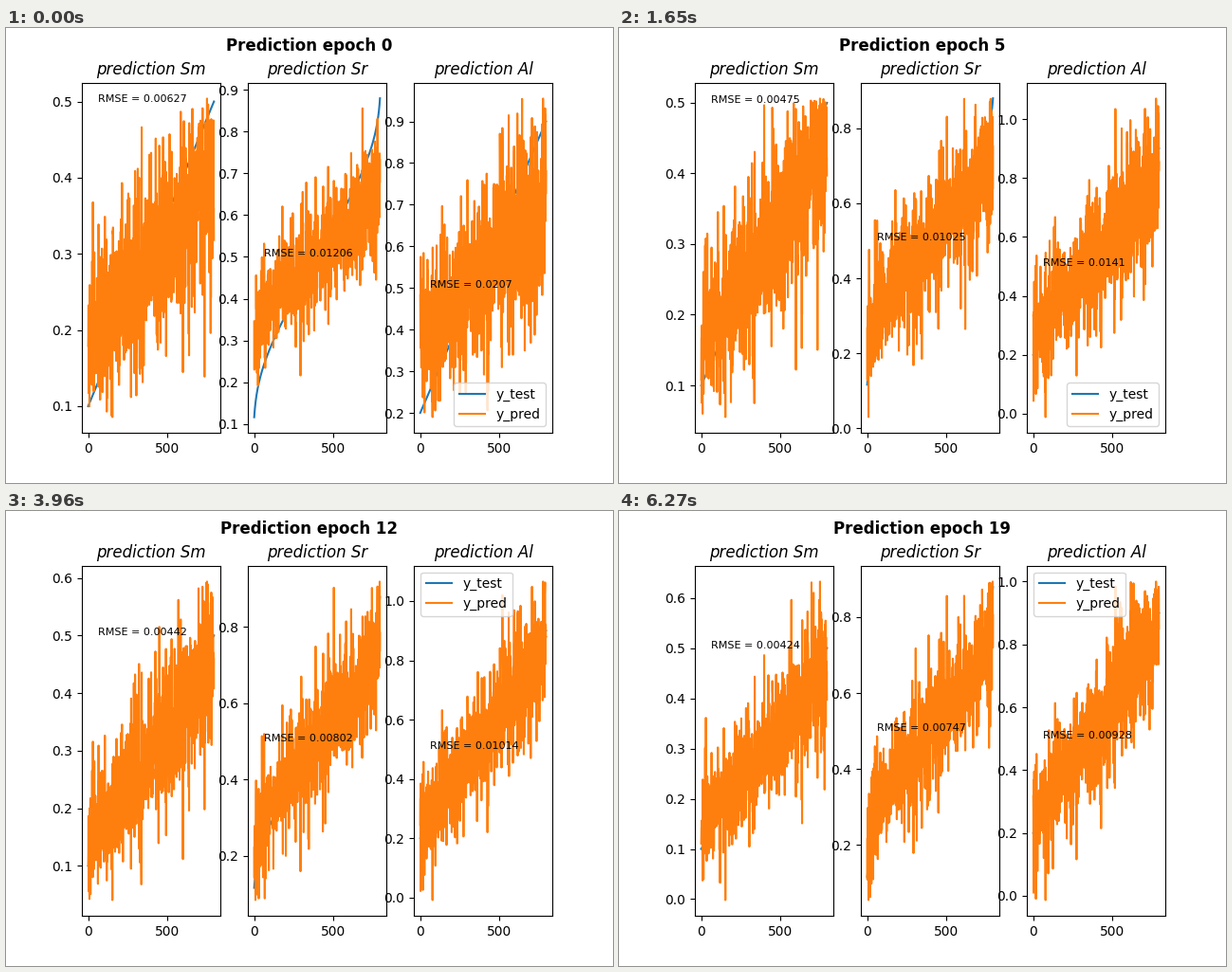
Write a matplotlib script that moves like this. It is 640 px wide and 480 px high and loops after 6.6 s.

```python
import numpy as np
import matplotlib.pyplot as plt
from matplotlib.animation import FuncAnimation

EPOCHS, STEP_MS, N = 20, 330, 800
X = np.arange(N)
U = X / (N - 1)
KEY_EPOCHS = [0, 3, 5, 9, 12, 17, 19]
UPPER_LEGEND = {1, 2, 3, 8, 12, 15, 16, 17, 19}


class Panel:
    """A sorted test curve and a noisy prediction that learns to follow it."""

    def __init__(self, name, seed, truth, level, slope, peaks, low, high, rmse):
        self.name, self.seed, self.truth = name, seed, truth
        self.level, self.slope, self.peaks = level, slope, peaks
        self.keys = low, high, rmse

    def at(self, e):
        return [float(np.interp(e, KEY_EPOCHS, k)) for k in self.keys]

    def predict(self, e):
        low, high, error = self.at(e)
        start, end = self.slope
        slope = end + (start - end) * np.exp(-e / 4)
        centre = self.level + slope * (self.truth - self.level)

        # noise makes up the part of the error that the flat slope leaves
        bias = np.mean((centre - self.truth) ** 2)
        spread = np.sqrt(error - bias) * (0.85 + 0.3 * U)
        lasting = np.random.default_rng(self.seed).standard_t(6, N) / 1.22
        fresh = np.random.default_rng([self.seed, e]).normal(size=N)
        y = centre + spread * (0.87 * lasting + 0.5 * fresh)

        # fold outliers back inside the limits, then touch each limit once
        y = high - abs(high - y)
        y = low + abs(y - low)
        if low < self.truth[0]:
            y[self.peaks[0]] = low
        if high > self.truth[-1]:
            y[self.peaks[1]] = high
        return y


s_curve = 0.498 + 0.362 * (U - 0.5) + 0.0434 * np.log((U + 0.01) / (1.01 - U))
PANELS = [
    Panel("Sm", 11, 0.1 + 0.4 * U, 0.28, (0.57, 0.8), (154, 755),
          low=[.0858, .0760, .0552, .0515, .0409, .0001, -.0017],
          high=[.5039, .5138, .5061, .5466, .5936, .6352, .6323],
          rmse=[.00627, .00509, .00475, .00446, .00442, .0044, .00424]),
    Panel("Sr", 23, s_curve, 0.5, (0.5, 0.8), (8, 797),
          low=[.1172, .0727, .0305, .1088, .0847, .1010, .0555],
          high=[.8787, .8787, .8787, .9283, .9195, .9240, .8938],
          rmse=[.01206, .01029, .01025, .00834, .00802, .00785, .00747]),
    Panel("Al", 37, 0.2 + 0.7 * U, 0.55, (0.5, 0.88), (78, 780),
          low=[.1900, .1117, -.0110, -.0645, -.0092, .0066, -.0133],
          high=[.9550, 1.0137, 1.0695, 1.0518, 1.0659, 1.0598, 1.0003],
          rmse=[.0207, .01459, .0141, .01643, .01014, .00951, .00928]),
]

fig, axes = plt.subplots(1, 3, figsize=(6.4, 4.8), dpi=100)
heading = fig.suptitle("", fontweight="bold", fontsize=12)
lines, notes = [], []
for ax, panel in zip(axes, PANELS):
    ax.set_title("prediction " + panel.name, style="italic", fontsize=12)
    ax.plot(X, panel.truth, label="y_test")
    lines += ax.plot(X, panel.truth, label="y_pred")
    notes.append(ax.text(60, 0.5, "", fontsize=8))
    ax.set_xlim(-0.05 * (N - 1), 1.05 * (N - 1))
legend = axes[2].legend(loc="lower right")


def update(e):
    heading.set_text(f"Prediction epoch {e}")
    for ax, panel, line, note in zip(axes, PANELS, lines, notes):
        low, high, error = panel.at(e)
        margin = 0.05 * (high - low)
        ax.set_ylim(low - margin, high + margin)
        line.set_ydata(panel.predict(e))
        note.set_text(f"RMSE = {round(error, 5)}")
    legend.set_loc("upper left" if e in UPPER_LEGEND else "lower right")
    return [heading, legend, *lines, *notes]


anim = FuncAnimation(fig, update, frames=EPOCHS, init_func=lambda: update(0),
                     interval=STEP_MS, repeat=True, repeat_delay=0)
plt.show()
```
